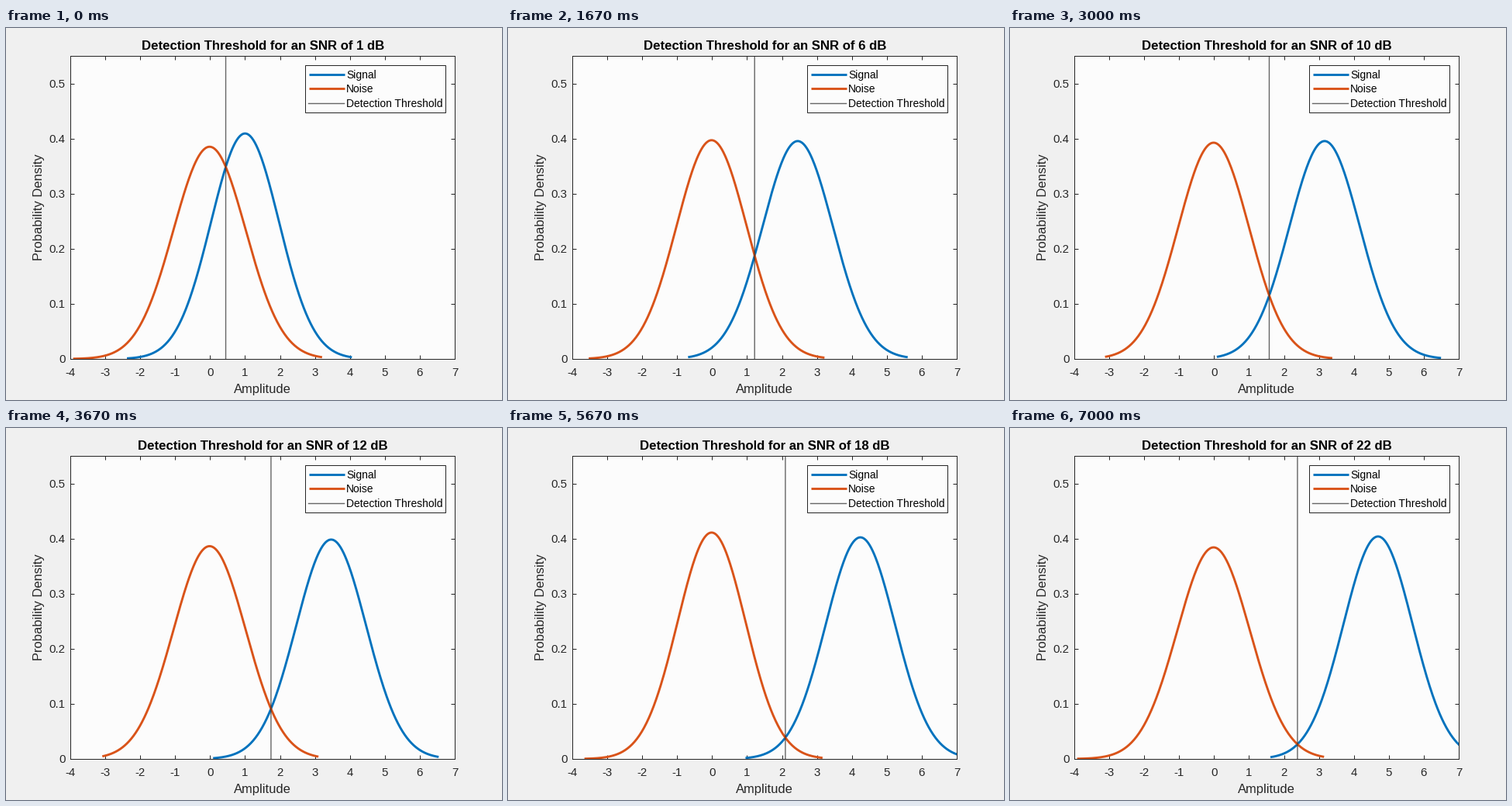
Animation of 640 by 480 pixels, one loop 7330 ms. Source, as a matplotlib script:

```python
import numpy as np
import matplotlib.pyplot as plt
from matplotlib.animation import FuncAnimation
from matplotlib.patches import Rectangle

W, H, DPI = 640, 480, 100
PX = 72 / DPI
LOOP_MS, RUNS, SUB = 7330, 22, 10

PAPER, PLOT_BG = "#f0f0f0", "#fcfcfc"
BLUE, ORANGE, INK = "#0072bd", "#d95319", "#262626"
CURVE = dict(lw=2.9 * PX, solid_capstyle="butt", zorder=3)
MARKER = dict(lw=1.4 * PX, color=INK, alpha=0.7, snap=False, zorder=4)

# Spread of the two samples at a few SNR values, in dB
KEY_SNR = (1, 4, 8, 12, 15, 18, 22)
NOISE_SIGMA = (1.036, 1.01, 1.0, 1.033, 0.997, 0.971, 1.039)
SIGNAL_SIGMA = (0.975, 1.002, 1.016, 1.002, 1.016, 0.992, 0.988)


def samples(snr):
    """(mean, sigma, min, max) of noise and signal; the signal sits at sqrt(snr)."""
    jitter = np.random.default_rng(snr).uniform(-0.2, 0.2, 3)
    noise_reach = 3.5 + 0.42 * np.cos(2 * np.pi * (snr - 1) / (RUNS - 1))
    noise_max, signal_reach, signal_rise = 3.2 + jitter
    mean = np.sqrt(snr)
    return ((-0.015, np.interp(snr, KEY_SNR, NOISE_SIGMA), -noise_reach, noise_max),
            (mean, np.interp(snr, KEY_SNR, SIGNAL_SIGMA),
             mean - signal_reach, mean + signal_rise))


def pdf(x, mean, sigma):
    return np.exp(-0.5 * ((x - mean) / sigma) ** 2) / (sigma * np.sqrt(2 * np.pi))


def curve(mean, sigma, lo, hi):
    x = np.linspace(lo, hi, 300)
    return x, pdf(x, mean, sigma)


def crossing(noise, signal):
    x = np.linspace(noise[0], signal[0], 4000)
    return x[np.argmin(abs(pdf(x, *noise[:2]) - pdf(x, *signal[:2])))]


plt.rcParams["font.family"] = "Liberation Sans"
fig = plt.figure(figsize=(W / DPI, H / DPI), dpi=DPI, facecolor=PAPER)


def put(x, y, text, size, color=INK, ha="center", **kw):
    """Text with its baseline at stage pixel (x, y)."""
    return fig.text(x / W, 1 - y / H, text, fontsize=size * PX, color=color,
                    ha=ha, va="baseline", **kw)


LEFT, RIGHT, TOP, BOTTOM = 83, 579, 36, 427
MID_X, MID_Y = (LEFT + RIGHT) / 2, (TOP + BOTTOM) / 2
ax = fig.add_axes([LEFT / W, 1 - BOTTOM / H, (RIGHT - LEFT) / W, (BOTTOM - TOP) / H],
                  facecolor=PLOT_BG)
ax.set(xlim=(-4, 7), ylim=(0, 0.55), xticks=range(-4, 8), yticks=np.arange(6) / 10)
ax.tick_params(direction="in", top=True, right=True, length=5 * PX, width=PX,
               color=INK, labelbottom=False, labelleft=False)
for spine in ax.spines.values():
    spine.set(color=INK, linewidth=PX)

for v in range(-4, 8):
    put(LEFT + (v + 4) * (RIGHT - LEFT) / 11, 449, str(v), 15)
for v in range(6):
    put(76.5, BOTTOM - v / 5.5 * (BOTTOM - TOP) + 5.5, f"{v / 10:g}", 15, ha="right")
put(MID_X, 471, "Amplitude", 16.5)
put(47, MID_Y - 0.5, "Probability Density", 16.5, rotation=90, rotation_mode="anchor")
title = put(MID_X + 0.5, 28, "", 16.7, "black", weight="bold")

signal_line, = ax.plot([], [], color=BLUE, **CURVE)
noise_line, = ax.plot([], [], color=ORANGE, **CURVE)
threshold = ax.axvline(0, **MARKER)

# Legend, laid out in stage pixels
key = fig.add_axes([0, 0, 1, 1], xlim=(0, W), ylim=(H, 0))
key.axis("off")
key.add_patch(Rectangle((386, 47.5), 181, 61, fc=PLOT_BG, ec=INK, lw=PX))
for y, label, style in ((59.5, "Signal", dict(CURVE, color=BLUE)),
                        (78, "Noise", dict(CURVE, color=ORANGE)),
                        (97.5, "Detection Threshold", MARKER)):
    key.plot([390.5, 436.5], [y, y], **style)
    put(439.3, y + 5, label, 13.85, "black", ha="left", zorder=5)


def draw(i):
    # each run appears one short tick early, so it is up when its slot begins
    snr = min((i + 1) // SUB, RUNS - 1) + 1
    noise, signal = samples(snr)
    noise_line.set_data(*curve(*noise))
    signal_line.set_data(*curve(*signal))
    threshold.set_xdata([crossing(noise, signal)] * 2)
    title.set_text(f"Detection Threshold for an SNR of {snr} dB")
    return noise_line, signal_line, threshold, title


anim = FuncAnimation(fig, draw, frames=RUNS * SUB, interval=LOOP_MS / (RUNS * SUB),
                     repeat=True, repeat_delay=0)
plt.show()
```
